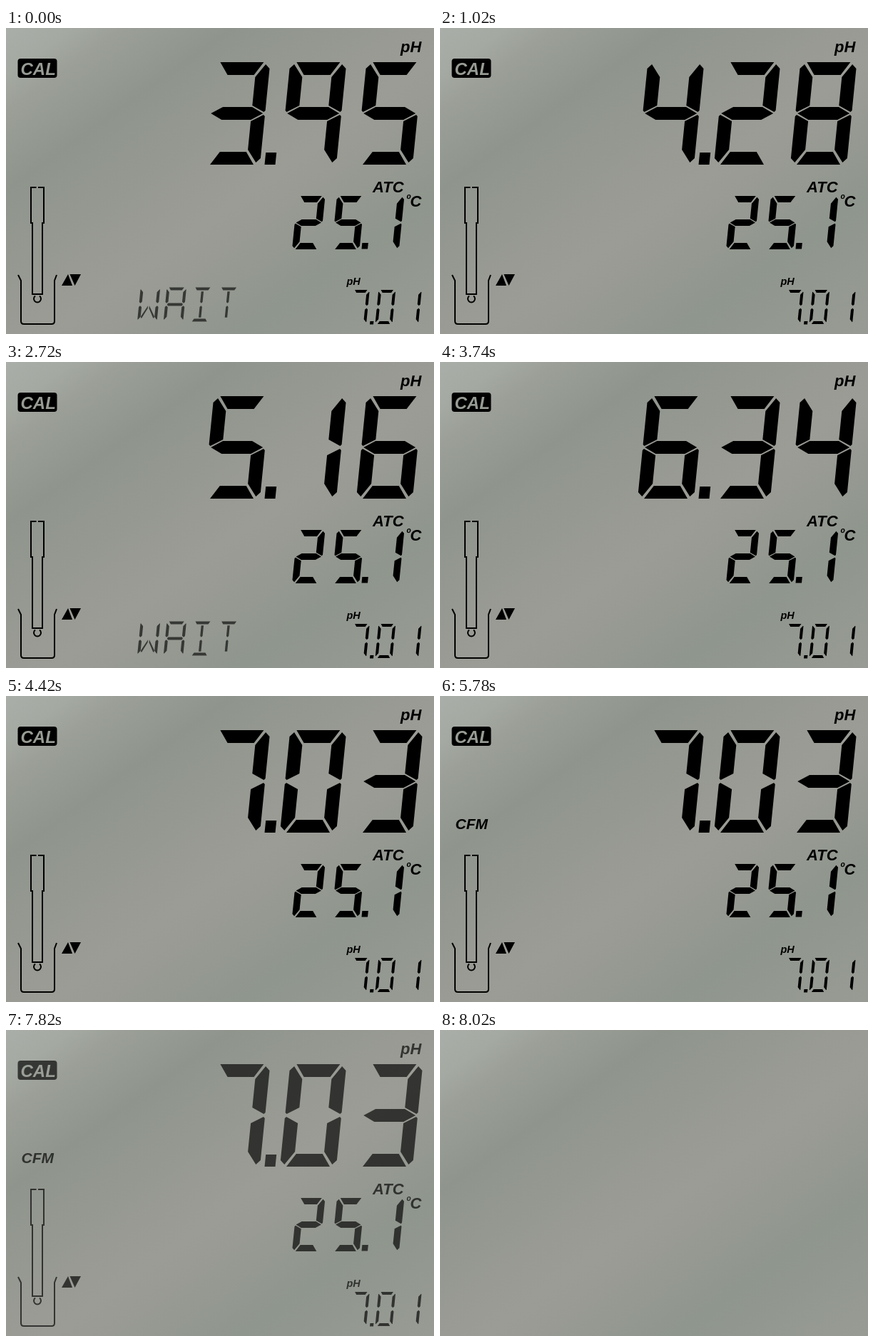
Recreate the animation shown at these times as an HTML page. Size 600 by 430 pixels, loop 8.22 s.

```html
<!DOCTYPE html>
<html lang="en">
<head>
<meta charset="utf-8">
<title>pH calibration display</title>
<style>
html, body { margin: 0; width: 100%; height: 100%; overflow: hidden; }
body {
  background: linear-gradient(144.4deg,
    #a9aea8 0, #a4a9a2 55px, #9b9f98 95px, #8f958d 185px,
    #9c9c96 385px, #8f968d 540px, #989b94 699px);
}
svg { display: block; width: 600px; height: 430px; }
text { font: italic bold 22px "Liberation Sans", Arial, sans-serif; }
.line { fill: none; stroke: #000; stroke-width: 2; }
#wait { fill: #363835; }
.timed { animation: 8220ms step-end infinite; }
#screen { animation-name: fade; }
/* 7820, 7920 and 8020 ms */
@keyframes fade {
  95.133% { opacity: 0.67; }
  96.350% { opacity: 0.33; }
  97.566%, 100% { opacity: 0; }
}
</style>
</head>
<body>
<svg viewBox="0 0 600 430">
  <g id="screen" class="timed">
    <rect x="16.5" y="43" width="55" height="27" rx="4"/>
    <text x="20.5" y="65.5" fill="#979c94" style="font-size:24px">CAL</text>
    <text x="553" y="33.5">pH</text>
    <text x="514" y="231">ATC</text>
    <text x="561" y="246" style="font-size:16px">º</text>
    <text x="566.5" y="250.5">C</text>
    <text x="477.5" y="361" style="font-size:14.5px">pH</text>
    <text id="cfm" class="timed" x="21.5" y="187" style="font-size:21px">CFM</text>

    <g class="line">
      <path d="M42.5 224H35V274H37V374H51V274H53V224H45"/>
      <path d="M41 376.5A5 5 0 1 0 47 376.5"/>
      <path d="M17 347L21 355V412Q21 416 25 416H64Q68 416 68 412V355L71 347"/>
    </g>
    <path d="M78 362L87 346L93 362ZM89.5 346H105L96.5 362Z"/>
  </g>
</svg>
<script>
const LOOP = 8220, TICK = 340, TICKS = 23, SLANT = 0.1;
const screen = document.getElementById('screen');
const style = document.head.appendChild(document.createElement('style'));

// Segment shapes for a w x h cell: s, t = stroke width and height, m = corner cut, q = gap
function makeFont(w, h, s, t, m, q) {
  const c = h / 2, x = w / 2, p = s * 0.42;
  const flipX = pts => pts.map(([u, v]) => [w - u, v]);
  const flipY = pts => pts.map(([u, v]) => [u, h - v]);
  const both = pts => pts.concat(flipX(pts).reverse());

  const a = both([[s + q, t], [m + q, 0]]);
  const f = [[0, m + q], [m - q / 2, 1.5 * q], [s, t + 1.5 * q],
    [s, c - t / 2 - q], [q, c - q], [0, c - 2 * q]];
  const g = both([[s, c + t / 2], [1.5 * q, c], [s, c - t / 2]]);
  // Centre stem and lower diagonal, for letters
  const i = [[x - p, t + q], [x + p, t + q], [x + p, c - 2 * q], [x, c - q], [x - p, c - 2 * q]];
  const k = [[x - q / 2, c + q], [x - q / 2, c + 3 * q], [s + q, h - t - q / 2],
    [s + q / 4, h - t - q / 2], [s + q / 4, h - t - 2 * q]];

  const e = flipY(f);
  return { h, a, f, e, g, i, k, b: flipX(f), c: flipX(e), d: flipY(a), l: flipY(i), m: flipX(k) };
}

const GLYPHS = {
  0: 'abcdef', 1: 'bc', 2: 'abged', 3: 'abgcd', 4: 'fgbc', 5: 'afgcd', 6: 'afgedc', 7: 'abc', 8: 'abcdefg', 9: 'abcfg',
  W: 'febckm', A: 'febcag', I: 'aild', T: 'ail'
};

// Path of slanted points in a cell at x, y
const outline = (pts, x, y, h) =>
  'M' + pts.map(([u, v]) => [x + u + SLANT * (h - v), y + v]).join('L') + 'Z';

function write(str, font, x, y, pitch, id) {
  const d = [...str].flatMap((ch, n) =>
    [...GLYPHS[ch]].map(seg => outline(font[seg], x + n * pitch, y, font.h)));
  addPath(d.join(''), id);
}

function dot(x, y, w, h) {
  addPath(outline([[0, 0], [w, 0], [w, h], [0, h]], x, y, h));
}

function addPath(d, id) {
  const path = document.createElementNS('http://www.w3.org/2000/svg', 'path');
  path.setAttribute('d', d);
  if (id) {
    path.id = id;
    path.setAttribute('class', 'timed');
  }
  screen.append(path);
}

// Hard on/off switching, decided once per tick
function blink(id, isOn) {
  let keys = '';
  for (let k = 0; k <= TICKS; k++) {
    const at = Math.max(0, k * TICK / LOOP * 100 - 0.001).toFixed(4);
    keys += `${at}% { visibility: ${isOn(k) ? 'visible' : 'hidden'} } `;
  }
  style.textContent += `@keyframes ${id} { ${keys} } #${id} { animation-name: ${id} }\n`;
}

const large = makeFont(79, 144, 19, 18, 7, 2);
const medium = makeFont(39, 75, 9.5, 9, 3.5, 1.2);
const small = makeFont(24, 48, 4, 4, 1.5, 1.8);
const letter = makeFont(27.5, 48, 4, 4, 1.5, 1.8);

const readings = ['395', '428', '516', '634', '703'];
readings.forEach((num, n) => {
  write(num, large, 277, 48, 107, 'ph' + n);
  blink('ph' + n, k => Math.min(Math.floor(k / 3), readings.length - 1) === n);
});
dot(362.5, 175, 15, 17);

write('251', medium, 401, 236, 55.5);
dot(498.5, 302, 8.5, 8.5);

write('701', small, 481, 368, 36.5);
dot(510, 412, 5, 4.5);

write('WAIT', letter, 184, 364.5, 36.7, 'wait');
blink('wait', k => k < 15 && k % 2 === 0);
blink('cfm', k => k >= 15 && ![16, 19, 21].includes(k));
</script>
</body>
</html>
```
